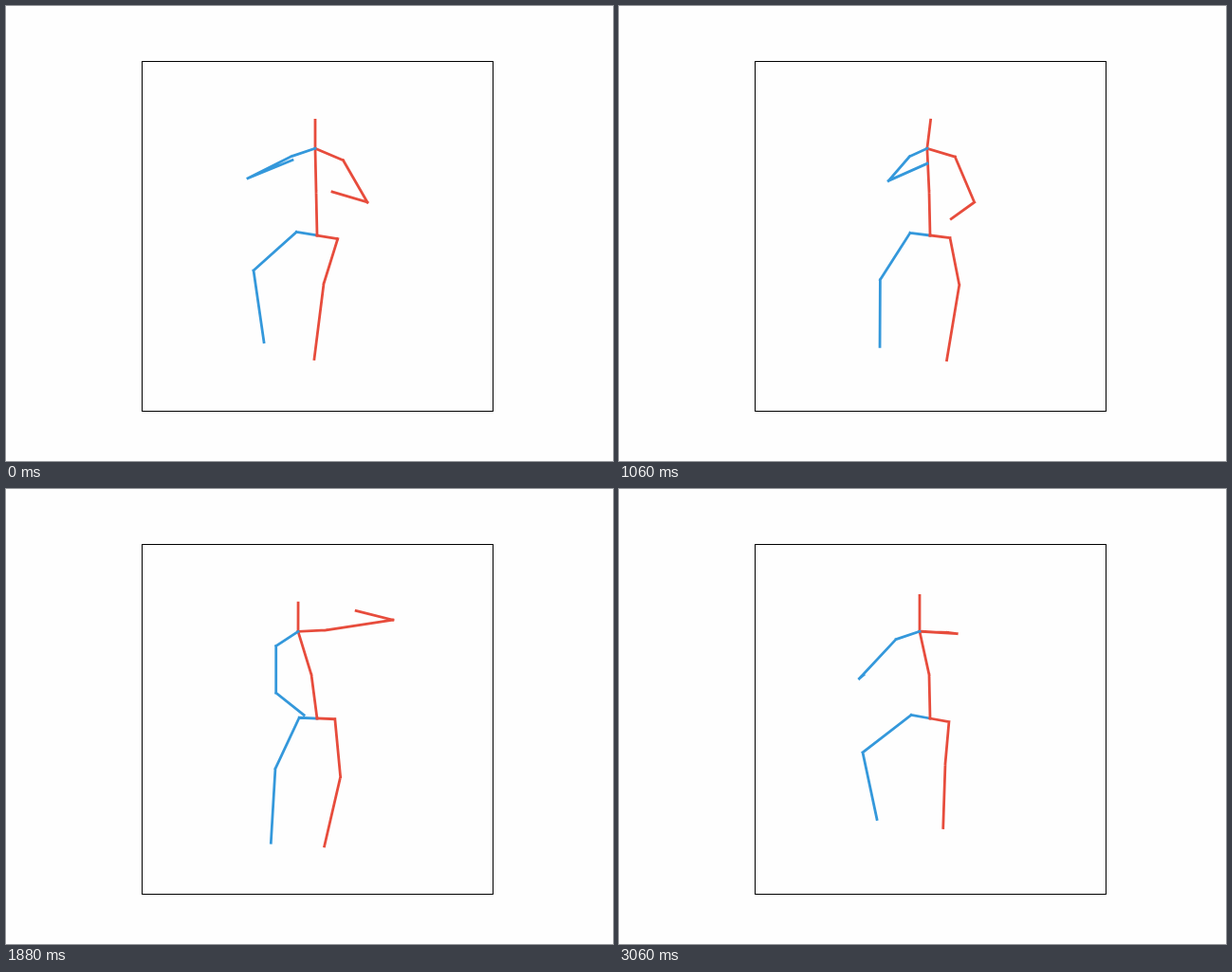
Write an HTML page that moves like this. It is 640x480 px and loops after 3.12 s.

```html
<!DOCTYPE html>
<html lang="en">
<head>
<meta charset="utf-8">
<title>Stick figure</title>
<style>
  html, body { margin: 0; width: 100%; height: 100%; overflow: hidden; background: #fefefe; }
  svg { display: block; }
  path, rect { fill: none; }
  rect { stroke: #000; }
  path { stroke: #e74c3c; stroke-width: 2.78; stroke-linecap: square; }
  .blue { stroke: #3498db; }
</style>
</head>
<body>
<svg width="640" height="480" viewBox="0 0 640 480">
  <rect x="143.5" y="58.5" width="370" height="369"/>
  <path id="blueLeg" class="blue"/>
  <path id="redLeg"/>
  <path id="torso"/>
  <path id="redArm"/>
  <path id="blueArm" class="blue"/>
</svg>
<script>
const LOOP = 3120;
const STEP = 62.5;

const point = (x, y) => ({ x, y });
const offset = (from, dx, dy) => point(from.x + dx, from.y + dy);

// The pose at a step: rest places moved by lasting shifts (ramp) and passing swings (swing)
function pose(step) {
  const ramp = (from, to) => {
    const u = Math.min(Math.max((step - from) / (to - from), 0), 1);
    return u * u * (3 - 2 * u);
  };
  const swing = (peak, width) => Math.exp(-(((step - peak) / width) ** 2));

  const pelvis = point(328, 242);
  const spine = point(327 - 5 * swing(30, 4), 196);
  const neck = point(326 - 9 * ramp(14, 30) - 9 * swing(30, 7), 150.3);
  const head = offset(neck, 10 * swing(21, 4), -30 - 8 * ramp(28, 49));

  // The hips tilt as one bar through the pelvis
  const hipX = 20.3 + 1.8 * Math.cos(2 * Math.PI * (step - 6) / 60);
  const hipY = 3.6 - 3.8 * swing(26, 7.5);

  const blueLeg = [
    pelvis,
    offset(pelvis, -hipX, -hipY),
    point(261 + 24 * ramp(0, 30) - 31 * ramp(29, 38) + 3 * ramp(43, 49),
          279 + 31 * swing(24.5, 7) - 15 * swing(40, 5.5)),
    point(272 + 17 * swing(24.5, 6) - 5 * swing(11, 4),
          354.5 + 7.5 * swing(13, 6) + 19 * swing(29.5, 4) - 6 * ramp(38, 49))
  ];

  const redLeg = [
    pelvis,
    offset(pelvis, hipX, hipY),
    point(335 + 14 * ramp(0, 30) + 27 * swing(21.5, 6) - 5 * ramp(40, 49),
          293 + 16 * swing(26.5, 6) - 18 * swing(41, 6)),
    point(325 + 47 * swing(22, 5.5) + 5 * ramp(20, 30) + 12 * ramp(38, 50),
          372.5 + 5 * ramp(0, 12) - 14 * swing(21, 3.5) - 20 * ramp(28, 48))
  ];

  const redArm = [
    neck,
    offset(neck, 29.5, 12.5 - 14 * ramp(12, 27) + 2.5 * ramp(43, 49)),
    point(381 - 8 * ramp(5, 22) + 35 * swing(30, 4) - 30 * ramp(30, 44) + 14 * ramp(43, 50),
          207 - 87 * ramp(18, 35) + 37 * ramp(38, 52)),
    point(344 + 27 * ramp(12, 28) - 66 * ramp(29, 39) + 15 * ramp(43, 49),
          196 + 9 * ramp(0, 12) + 37 * swing(21, 5) - 78 * ramp(22, 30) + 24 * ramp(40, 50))
  ];

  const blueArm = [
    neck,
    offset(neck, -25 + 9 * swing(21, 7), 8.3 + 7 * swing(30, 7)),
    point(255 + 38 * ramp(6, 22) - 44 * ramp(20, 56),
          182 - 32 * swing(11, 5) + 33 * ramp(13, 24) - 15 * ramp(38, 49)),
    point(302 + 46 * ramp(13, 21) - 84 * ramp(20, 43) - 6 * ramp(44, 49),
          162.5 + 76 * ramp(15, 30) - 43 * ramp(36, 50))
  ];

  return { blueLeg, redLeg, torso: [pelvis, spine, neck, head], redArm, blueArm };
}

// Each bone is its own stroke
function bones(joints) {
  const ends = joints.map(({ x, y }) => `${x.toFixed(2)} ${y.toFixed(2)}`);
  return ends.slice(1).map((end, i) => `M${ends[i]}L${end}`).join("");
}

// Step changes fall on whole hundredths of a second
function stepAt(ms) {
  return Math.ceil((Math.floor(ms / 10) + 0.5) * 10 / STEP) - 1;
}

function draw() {
  const limbs = pose(stepAt(performance.now() % LOOP));
  for (const id in limbs) {
    document.getElementById(id).setAttribute("d", bones(limbs[id]));
  }
  requestAnimationFrame(draw);
}
draw();
</script>
</body>
</html>
```
